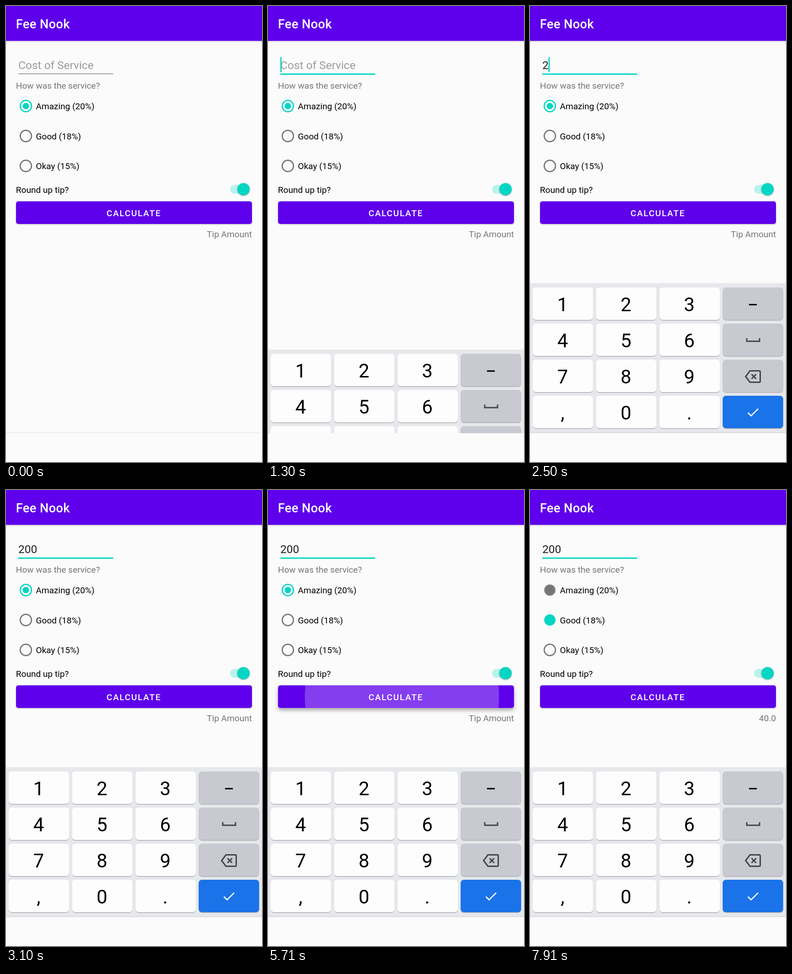
An HTML page that plays this animation: 561x998 px, repeating every 8 s.

```html
<!DOCTYPE html>
<html lang="en">
<head>
<meta charset="utf-8">
<title>Fee Nook</title>
<style>
html, body { margin: 0; width: 100%; height: 100%; overflow: hidden; background: #fbfbfc; }
svg { display: block; width: 561px; height: 998px; font-family: Roboto, sans-serif; }
text { white-space: pre; }
.body { font-size: 19.1px; }
.field { font-size: 24.5px; }
.medium { font-weight: 500; fill: #fff; }
.grey { fill: #757575; }
.digit { font-size: 42px; text-anchor: middle; }
.icon { fill: none; stroke: #444549; stroke-width: 3; }
</style>
</head>
<body>
<svg viewBox="0 0 561 998">
  <defs>
    <linearGradient id="fade" x2="0" y2="1">
      <stop offset="0" stop-color="#000" stop-opacity=".16"/>
      <stop offset="1" stop-color="#000" stop-opacity="0"/>
    </linearGradient>
    <clipPath id="buttonClip"><rect x="22" y="427.5" width="517" height="49.5" rx="5"/></clipPath>
    <clipPath id="padClip"><rect y="600" width="561" height="335"/></clipPath>
  </defs>
  <rect width="561" height="998" fill="#fbfbfc"/>
  <rect y="76" width="561" height="4" fill="url(#fade)"/>
  <rect width="561" height="76.3" fill="#5e00eb"/>
  <text class="medium" x="21.8" y="49" font-size="27.3" letter-spacing=".34">Fee Nook</text>

  <text id="cost" class="field" x="27" y="138"></text>
  <rect id="line" x="27" width="208"/>
  <rect id="caret" y="112" width="2.7" height="33" fill="#03d6c3"/>

  <text class="body grey" x="21.8" y="180.5">How was the service?</text>
  <circle id="halo" cx="43.5" cy="284.5"/>
  <g id="radios"></g>

  <text class="body" x="21.8" y="408.5">Round up tip?</text>
  <rect x="491" y="391.5" width="42" height="19.5" rx="9.75" fill="#b9f2eb"/>
  <circle cx="520.5" cy="401" r="13.6" fill="#03d6c3" style="filter:drop-shadow(0 1.5px 1.5px #0005)"/>

  <rect id="button" x="22" y="427.5" width="517" height="49.5" rx="5" fill="#5e00eb"/>
  <circle id="ripple" cy="452.3" fill="#fff" clip-path="url(#buttonClip)"/>
  <text class="medium" x="220.3" y="459.5" font-size="19.1" letter-spacing="1.7">CALCULATE</text>
  <text id="tip" class="body grey" x="539" y="506" text-anchor="end"></text>

  <g clip-path="url(#padClip)">
    <g id="pad">
      <rect y="607" width="561" height="327.5" fill="#e6e8eb"/>
      <rect y="606" width="561" height="1.5" fill="#eff0f2"/>
      <rect y="933" width="561" height="1.5" fill="#d9dadd"/>
      <g id="keys"></g>
      <rect x="480" y="652" width="17" height="3.2"/>
      <path class="icon" d="M475 727v6.7h28V727"/>
      <path class="icon" d="M482 798.5h20.5q2 0 2 2v21q0 2-2 2H482L472.500 811ZM485.500 806l10 10m0-10l-10 10"/>
      <path class="icon" d="M477.500 890l7 7L500 881.500" style="stroke:#fff;stroke-width:2.6"/>
    </g>
  </g>
</svg>
<script>
const LOOP = 8000;
const TEAL = '#03d6c3', GREY = '#757575';
const el = id => document.getElementById(id);
const set = (id, attrs) => {
  for (const k in attrs) el(id).setAttribute(k, attrs[k]);
};
const within = (t, spans) => spans.some(([a, b]) => t >= a && t < b);
const clamp = x => Math.min(1, Math.max(0, x));
const easeOut = x => 1 - (1 - clamp(x)) ** 2;

// Keypad
const rows = ['123', '456', '789', ',0.'];
el('keys').innerHTML = rows.map((row, r) => [0, 1, 2, 3].map(c => {
  const x = 6 + c * 138.75, y = 616 + r * 79;
  const fill = c < 3 ? '#fdfdfe' : r < 3 ? '#c9cad1' : '#1a73e8';
  const box = (dy, color) =>
    `<rect x="${x}" y="${y + dy}" width="132.500" height="71" rx="7" fill="${color}"/>`;
  const label = c < 3 ? `<text class="digit" x="${x + 65.5}" y="${y + 52}">${row[c]}</text>` : '';
  return box(1.4, '#abadb2') + box(0, fill) + label;
}).join('')).join('');

const options = [['Amazing (20%)', 219], ['Good (18%)', 284.5], ['Okay (15%)', 350]];

function radio([label, y], mode) {
  const circle = (r, attrs) => `<circle cx="43.5" cy="${y}" r="${r}" ${attrs}/>`;
  const ring = color => circle(12.3, `fill="none" stroke="${color}" stroke-width="2.7"`);
  const marks = {
    off: () => ring(GREY),
    on: () => ring(TEAL) + circle(7, `fill="${TEAL}"`),
    leaving: () => circle(12.3, `fill="${GREY}"`) +
      circle(10.3, 'fill="none" stroke="#929292" stroke-width=".8"'),
    entering: () => circle(12.4, `fill="${TEAL}"`)
  };
  return marks[mode]() + `<text class="body" x="65.500" y="${y + 7}">${label}</text>`;
}

const caretOn = [[1100, 1500], [2100, 3100], [3710, 4110], [4710, 5110], [5910, 6310], [6710, 7110]];

let radioState = '';
function drawRadios(t) {
  const modes = t < 7910 ? ['on', 'off', 'off'] : ['leaving', 'entering', 'off'];
  const state = modes.join();
  if (state === radioState) return;
  radioState = state;
  el('radios').innerHTML = options.map((o, i) => radio(o, modes[i])).join('');
}

function draw(time) {
  const base = time < 3110 ? 100 : 110;
  const t = base + 200 * Math.floor((time - base) / 200);

  const typed = '200'.slice(0, Math.max(0, Math.floor((t - 2300) / 200)));
  el('cost').textContent = typed || 'Cost of Service';
  set('cost', { fill: typed ? '#1f1f1f' : '#9b9b9d' });

  const focused = t >= 1100;
  set('line', {
    y: focused ? 147.6 : 147.7,
    height: focused ? 3 : 1.4,
    fill: focused ? TEAL : '#7c7a76'
  });
  set('caret', {
    x: 27 + typed.length * 13.5,
    visibility: within(t, caretOn) ? 'visible' : 'hidden'
  });

  const slide = 327 * (1 - easeOut((t - 1200) / 300));
  set('pad', { transform: `translate(0 ${slide})` });

  // Button press
  const press = t - 5510;
  const pressed = press >= 0 && press < 400;
  el('button').style.filter = pressed
    ? 'drop-shadow(0 5px 4px #0005)' : 'drop-shadow(0 1.5px 1.5px #0004)';
  const grow = clamp((press + 70) / 340);
  set('ripple', {
    cx: 297 - 4.4 * grow,
    r: 268 * grow,
    opacity: press < 0 ? 0 : 0.24 * (1 - clamp((press - 200) / 500))
  });
  el('tip').textContent = t < 5910 ? 'Tip Amount' : '40.0';

  // Touch halo on the second option
  const touch = t - 7110;
  set('halo', {
    r: 27.3 * easeOut((touch + 100) / 500),
    opacity: touch < 0 ? 0 : 0.12 * (1 - clamp((touch - 400) / 400))
  });
  drawRadios(t);
}

const start = performance.now();
function frame() {
  draw((performance.now() - start) % LOOP);
  requestAnimationFrame(frame);
}
frame();
</script>
</body>
</html>
```
